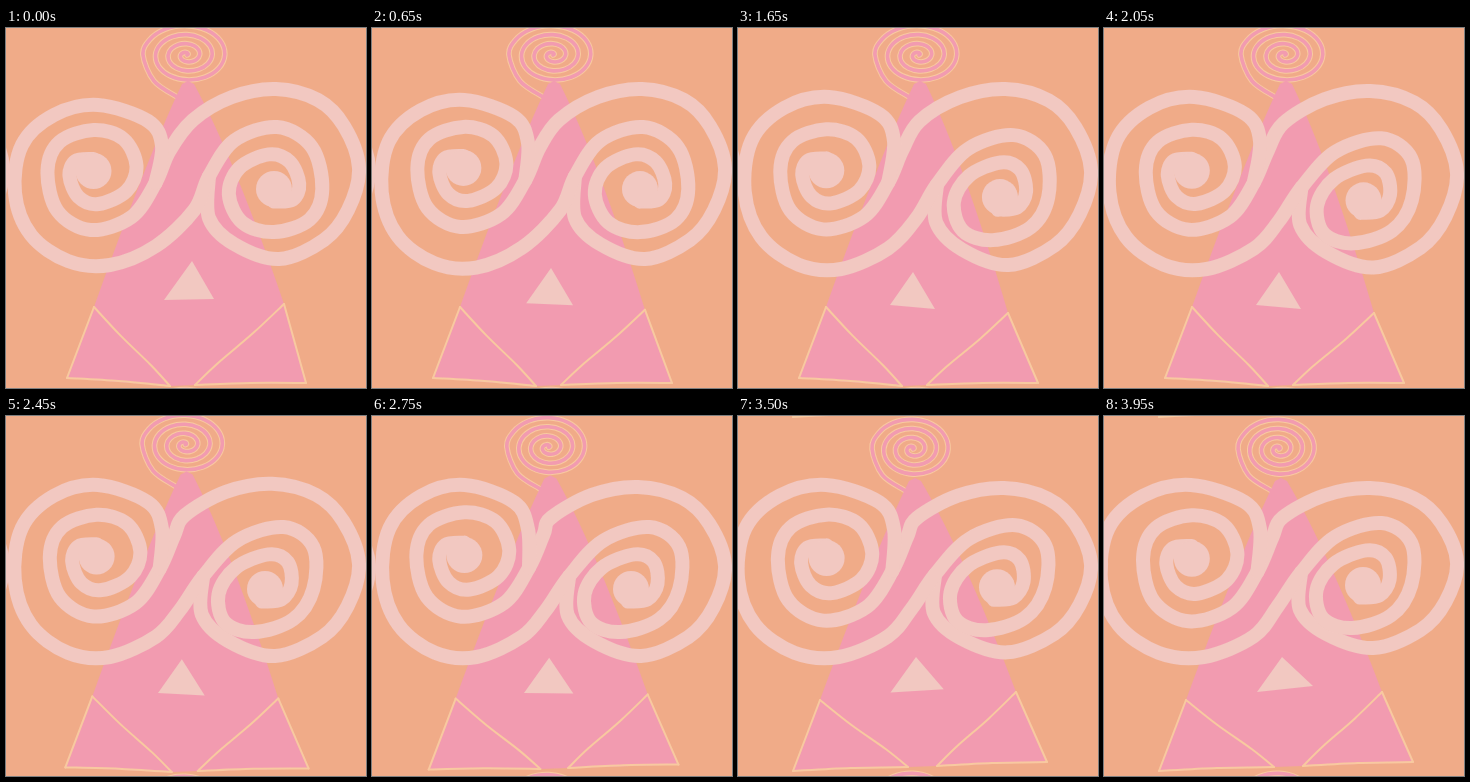
Write an HTML page with a canvas that moves like this. It is 360 px wide and 360 px high and loops after 4 s.

```html
<!DOCTYPE html>
<html>
<head>
<meta charset="utf-8">
<title>Spiral face</title>
<style>
html, body { margin: 0; width: 100%; height: 100%; overflow: hidden; background: #f0ab88; }
canvas { display: block; width: 360px; height: 360px; }
</style>
</head>
<body>
<canvas id="stage" width="360" height="360"></canvas>
<script>
const ctx = document.getElementById('stage').getContext('2d');
const ORANGE = '#f0ab88', PINK = '#f29bb0', PALE = '#f2c8c1', CREAM = '#f8c9a0';
const LOOP = 4000, STEP = 50;

// one spiral arm, outward from the eye; the right eye uses it turned half way round
const ARM = [
  [0, -12], [-18, -10], [-24, 5], [-15, 26], [5, 33], [33, 20], [43, -5], [30, -32],
  [0, -41], [-34, -29], [-46, 0], [-36, 40], [-3, 59], [38, 46], [62, 12], [76, -20]
];
// outer bands around each eye
const RIM_L = [
  [156, 118], [142, 93], [92, 77], [48, 87], [16, 117],
  [9, 165], [25, 207], [62, 233], [104, 237], [150, 218]
];
const RIM_R = [
  [187, 92], [226, 69], [270, 61], [312, 72], [338, 98],
  [353, 140], [342, 182], [318, 212], [273, 231], [228, 216], [203, 190]
];

function ease(t, from, to) {
  const k = Math.min(1, Math.max(0, (t - from) / (to - from)));
  return k * k * (3 - 2 * k);
}

// a point plus any number of [amount, dx, dy] moves
function at(x, y, ...moves) {
  return moves.reduce(([px, py], [k, dx, dy]) => [px + k * dx, py + k * dy], [x, y]);
}

function mix(a, b, k, dx = 0, dy = 0) {
  return [a[0] + (b[0] - a[0]) * k + dx, a[1] + (b[1] - a[1]) * k + dy];
}

// shift the left, top and bottom sides of a band, blending in between
function pull(pts, left, top, bottom) {
  const xs = pts.map(p => p[0]), ys = pts.map(p => p[1]);
  const x0 = Math.min(...xs), x1 = Math.max(...xs);
  const y0 = Math.min(...ys), y1 = Math.max(...ys);
  return pts.map(([x, y]) => {
    const u = (x1 - x) / (x1 - x0), v = (y - y0) / (y1 - y0);
    return [x + left * u, y + top * (1 - v) + bottom * v];
  });
}

function arm([cx, cy], size, shear) {
  return ARM.map(([x, y]) => [cx + size * (x - shear * y), cy + size * y]);
}

function curve(pts) {
  const path = new Path2D();
  path.moveTo(...pts[0]);
  for (let i = 0; i < pts.length - 1; i++) {
    const a = pts[Math.max(i - 1, 0)], b = pts[i], c = pts[i + 1];
    const d = pts[Math.min(i + 2, pts.length - 1)];
    path.bezierCurveTo(b[0] + (c[0] - a[0]) / 6, b[1] + (c[1] - a[1]) / 6,
      c[0] - (d[0] - b[0]) / 6, c[1] - (d[1] - b[1]) / 6, c[0], c[1]);
  }
  return path;
}

function line(path, color, width) {
  ctx.strokeStyle = color;
  ctx.lineWidth = width;
  ctx.stroke(path);
}

function fill(path, color) {
  ctx.fillStyle = color;
  ctx.fill(path);
}

function drawCurl(tail, [cx, cy], size, squash) {
  const pts = [tail, [cx - 33 * size, cy + 26]];
  const turns = 3.5, n = 42;
  for (let i = 0; i <= n; i++) {
    const r = 44 * size * (1 - i / n), a = Math.PI + i / n * turns * 2 * Math.PI;
    pts.push([cx + r * Math.cos(a), cy + r * squash * Math.sin(a)]);
  }
  const path = curve(pts);
  line(path, CREAM, 5.6);
  line(path, PINK, 3.6);
}

function drawLeg(hip, foot, crotch) {
  line(curve([hip, mix(hip, crotch, .35, 0, 1), mix(hip, crotch, .75, 0, -1), crotch]), CREAM, 2);
  line(curve([crotch, mix(crotch, foot, .5, 0, -1), foot]), CREAM, 2);
  line(curve([foot, hip]), CREAM, 2);
}

function drawBody(apex, left, right) {
  const [x, y] = apex, path = new Path2D();
  path.moveTo(x - 6, y + 3);
  path.quadraticCurveTo(...mix(apex, left[0], .35, -9), ...left[0]);
  [left[1], left[2], right[2], right[1], right[0]].forEach(p => path.lineTo(...p));
  path.quadraticCurveTo(...mix(apex, right[0], .35, 13), x + 6, y + 3);
  path.lineTo(x, y);
  fill(path, PINK);
  drawLeg(...left);
  drawLeg(...right);
}

function drawEye([x, y], pts) {
  line(curve(pts), PALE, 14);
  const blob = new Path2D();
  blob.arc(x, y, 18, 0, 7);
  fill(blob, PALE);
}

function drawFigure(t) {
  const early = ease(t, 0, 1100), mid = ease(t, 600, 2300);
  const late = ease(t, 2100, 3100), last = ease(t, 3100, 3950);
  const dip = early * (1 - late);
  const sway = Math.cos(2 * Math.PI * t / 1900);

  drawCurl(at(171, 69, [late, -5, 5]), at(181, 27, [late, -6, 6]), 1 - .07 * late, .72 + .06 * late);

  drawBody(at(182, 53, [late, -5, 9]),
    [at(88, 279, [late, -6, 5]), at(61, 350, [late, -6, 5]), at(164, 358, [late, 6, -7])],
    [at(278, 276, [dip, -8, 9]), at(300, 355, [late, 9, -9]), at(189, 357, [late, 10, -7])]);

  fill(new Path2D('M' + [
    at(186, 233, [early, -11, 11], [late, 3, -3]),
    at(158, 272, [early, -6, 5], [last, 1, -1]),
    at(208, 271, [early, -11, 10], [late, 6, -5], [last, 6, -6])
  ].join('L') + 'Z'), PALE);

  const eyeL = at(90, 141, [sway, -2.5, 2]);
  const eyeR = at(268, 161, [mid, -9, 12], [last, 0, -4]);
  const armL = arm(eyeL, 1 + .06 * late, 0);
  const armR = arm(eyeR, -1.05, .25 * mid);
  const rimL = pull(RIM_L, -8 * sway * t / LOOP - 5 * late, -8 * early, 4 * early);
  const rimR = pull(RIM_R, -8 * mid, 11 * ease(t, 1700, 3000), 9 * mid - 8 * last);
  drawEye(eyeL, [...armL, ...rimR, armR.at(-2)]);
  drawEye(eyeR, [...armR, ...rimL.reverse(), armL.at(-2)]);
}

function draw(t) {
  ctx.fillStyle = ORANGE;
  ctx.fillRect(0, 0, 360, 360);
  // neighbours of the repeating pattern peek in at the edges
  const tall = 364 - 10 * ease(t, 2100, 3100);
  for (const [x, y] of [[0, tall], [0, -tall], [-356, 0], [0, 0]]) {
    ctx.save();
    ctx.translate(x, y);
    drawFigure(t);
    ctx.restore();
  }
}

ctx.lineJoin = ctx.lineCap = 'round';
const begin = performance.now();
function tick() {
  const t = (performance.now() - begin) % LOOP;
  draw(Math.floor(t / STEP) * STEP);
  requestAnimationFrame(tick);
}
tick();
</script>
</body>
</html>
```
